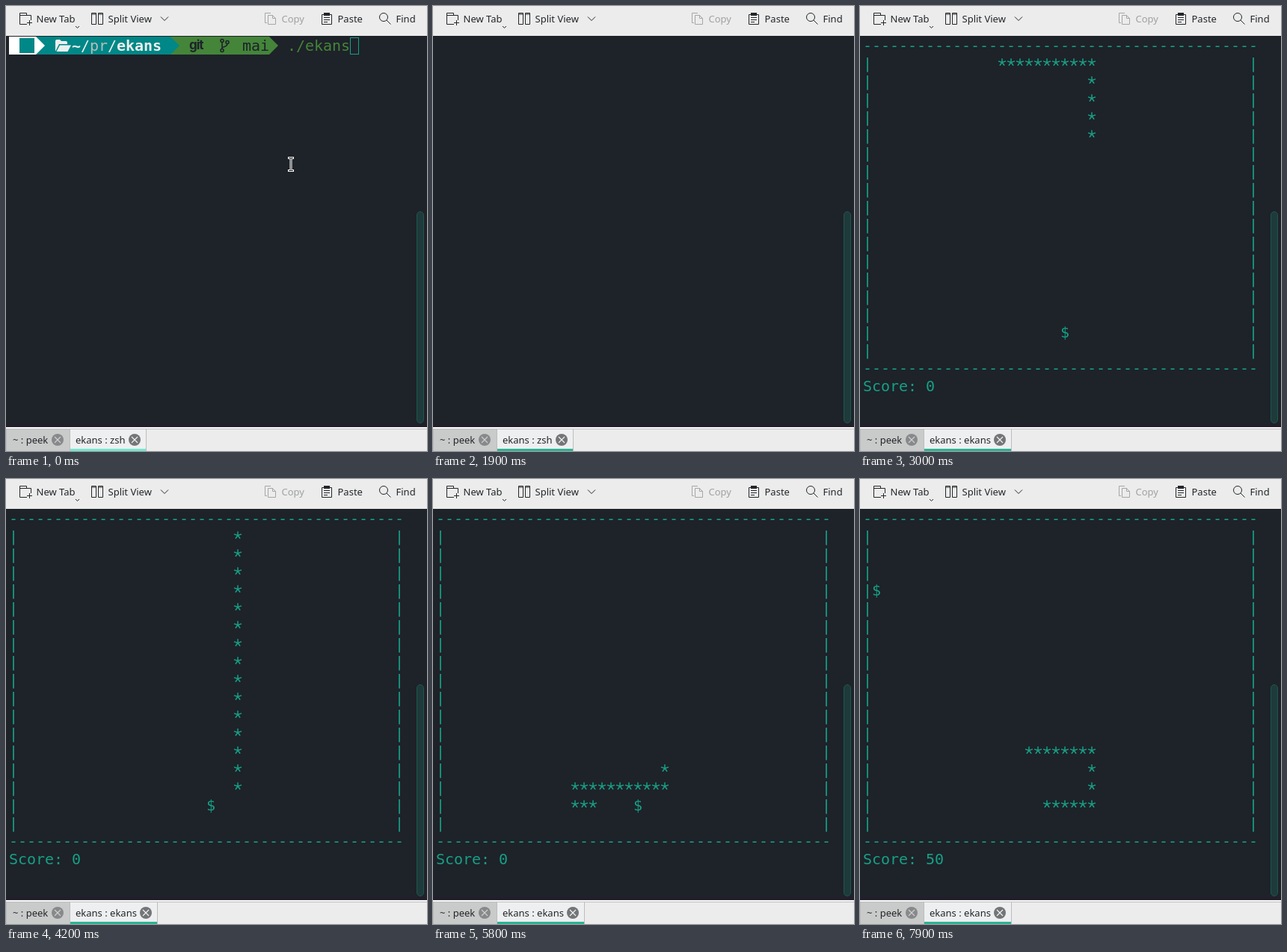
An HTML page for the animation above (8000 ms loop, 563 px wide and 596 px high).

```html
<!DOCTYPE html>
<html lang="en">
<head>
<meta charset="utf-8">
<title>Terminal snake</title>
<style>
  html, body { margin: 0; width: 100%; height: 100%; overflow: hidden; background: #1e2229; }
  svg { display: block; width: 563px; height: 596px; }
  text { white-space: pre; }
  .ui { font: 13px "Noto Sans", sans-serif; fill: #232629; }
  .mono { font: 20px "DejaVu Sans Mono", monospace; letter-spacing: -0.041px; fill: #16a085; }
  .bold { font-weight: bold; fill: #eee; }
  .icon { fill: none; stroke: #232629; }
</style>
</head>
<body>
<svg viewBox="0 0 563 596">
  <rect width="563" height="596" fill="#1e2229"/>

  <!-- toolbar -->
  <rect width="563" height="40" fill="#ececec"/>
  <g class="icon">
    <path d="M28 24.5H18.5V9.5H27.5V12.5H33.5V19M18 12.5H28M31.5 19V26M28 22.5H35"/>
    <path d="M93 27L95.5 29.5L98 27"/>
    <path d="M114.5 9.5h6v15h-6zM123.5 9.5h6v15h-6zM114 11h7M123 11h7"/>
    <path d="M207 14.5L212 19.5L217 14.5"/>
    <path d="M349 22.5H346.5V9.5H354M350.5 12.5H356.5L360.5 16.5V24.5H350.5zM356.5 12.5V16.5H360.5" stroke="#a5a6a7"/>
    <path d="M425 11.5H422.5V24.5H435.5V11.5H433M425 15.5H433M425 18.5H433M425 21.5H430"/>
    <path d="M425 9h8v4h-8z" fill="#232629" stroke="none"/>
    <circle cx="505" cy="15" r="5.5"/>
    <path d="M509 19L514.5 24.5"/>
  </g>
  <g class="ui">
    <text x="40.5" y="22">New Tab</text>
    <text x="136.5" y="22">Split View</text>
    <text x="368.5" y="22" fill="#a0a1a2" style="fill:#a0a1a2">Copy</text>
    <text x="443.5" y="22">Paste</text>
    <text x="521.5" y="22">Find</text>
  </g>

  <!-- shell prompt -->
  <g id="prompt" class="mono">
    <path d="M220 41H352L364 53L352 65H220z" fill="#44853a"/>
    <path d="M40 41H220L232 53L220 65H40z" fill="#008787"/>
    <path d="M4 41H40L52 53L40 65H4z" fill="#fff"/>
    <rect x="18" y="43" width="20" height="20" fill="#008787"/>
    <path d="M66 60V47Q66 45 68 45H72L74 47H80Q82 47 82 49V51H71L66.5 60zM67.5 61L72 52.5H87L82.5 61z" fill="#eee"/>
    <text x="88" y="60" class="bold">~</text>
    <text x="100" y="60" style="fill:#eee">/</text>
    <text x="112" y="60" style="fill:#bcbcbc">pr</text>
    <text x="136" y="60" style="fill:#eee">/</text>
    <text x="148" y="60" class="bold">ekans</text>
    <text x="245" y="58" style="font:bold 17px Inter,sans-serif;letter-spacing:-1px;fill:#1e2229">git</text>
    <g fill="none" stroke="#1e2229" stroke-width="1.6">
      <circle cx="289" cy="46.5" r="2"/>
      <circle cx="289" cy="59.5" r="2"/>
      <circle cx="296" cy="48.5" r="2"/>
      <path d="M289 48.5V57.5M296 50.5Q296 54 289 55.5"/>
    </g>
    <text x="316" y="60" style="fill:#1e2229">mai</text>
    <text x="376" y="60" style="fill:#44853a">./ekans</text>
  </g>
  <rect id="cursor" width="11" height="22" stroke="#16a085"/>

  <g id="game" class="mono">
    <g id="walls"></g>
    <path id="snake" fill="none" stroke="#16a085" stroke-width="1.5"/>
    <text id="food">$</text>
    <text id="score" x="4" y="516"></text>
  </g>

  <g id="pointer" fill="none">
    <path d="M377 203.5H385M377 220.5H385M381 203V221" stroke="#fff" stroke-width="3"/>
    <path d="M378 203.5H384M378 220.5H384M381 203V221" stroke="#1e2229"/>
  </g>

  <rect x="549.5" y="275.5" width="9" height="283" rx="4.5" fill="#1f3a3b" stroke="#1d564f"/>

  <!-- tab bar -->
  <rect y="560" width="563" height="4" fill="#221e2a"/>
  <rect y="564" width="563" height="32" fill="#ececec"/>
  <rect y="564" width="563" height="2" fill="#fafafa"/>
  <path d="M0 566.5H563" stroke="#bcbdbe"/>
  <rect x="1" y="567" width="84" height="29" fill="#c9caca"/>
  <path d="M.5 567V596" stroke="#bcbdbe"/>
  <rect id="tab" x="85.5" y="566.5" height="34" fill="#eeeff0" stroke="#bcbdbe"/>
  <rect id="line" x="86" y="593" height="3"/>
  <g class="ui">
    <text x="9" y="586">~ : peek</text>
    <text id="title" x="93" y="586"></text>
  </g>
  <g>
    <circle cx="69" cy="581" r="8" fill="#87898a"/>
    <path d="M65 577l8 8M73 577l-8 8" stroke="#d0d1d1" stroke-width="1.1"/>
  </g>
  <g id="close">
    <circle cy="581" r="8" fill="#737577"/>
    <path d="M-4 577l8 8M4 577l-8 8" stroke="#f4f5f5" stroke-width="1.1"/>
  </g>
</svg>
<script>
const LOOP = 8000, TICK = 100, START = 2100;
const PAUSES = [2700, 3200, 3800, 4400, 5000, 5600, 6200, 6900, 7500];
const CORNERS = [[7, 1], [25, 1], [25, 15], [15, 15], [15, 16], [25, 16], [25, 13], [18, 13]];
const FIRST_HEAD = 14, EAT = 50;

const $ = id => document.getElementById(id);
const set = (id, attrs) => {
  for (const k in attrs) $(id).setAttribute(k, attrs[k]);
};
const show = (id, on) => set(id, { visibility: on ? "visible" : "hidden" });
const colX = c => 4 + 12 * c;
const baseY = r => 60 + 24 * r;

// every cell the snake visits, in order
const trail = [CORNERS[0]];
for (const [cx, cy] of CORNERS.slice(1)) {
  let [x, y] = trail[trail.length - 1];
  while (x !== cx || y !== cy) {
    x += Math.sign(cx - x);
    y += Math.sign(cy - y);
    trail.push([x, y]);
  }
}

let arms = "";
for (let k = 0; k < 5; k++) {
  const a = k * Math.PI * 0.4;
  const dx = (5.3 * Math.sin(a)).toFixed(2), dy = (-5.3 * Math.cos(a)).toFixed(2);
  arms += `l${dx} ${dy}m${-dx} ${-dy}`;
}
const star = ([c, r]) => `M${colX(c) + 6} ${baseY(r) - 8.5}${arms}`;

const glyphs = (c, r, s) => `<text x="${colX(c)}" y="${baseY(r)}">${s}</text>`;
let walls = glyphs(0, 0, "-".repeat(44)) + glyphs(0, 18, "-".repeat(44));
for (let r = 1; r < 18; r++) walls += glyphs(0, r, "|") + glyphs(43, r, "|");
$("walls").innerHTML = walls;

function drawShell(t) {
  show("prompt", t < 1800);
  show("cursor", t < 1900);
  const [c, r] = t < 1700 ? [38, 0] : t < 1800 ? [0, 1] : [0, 0];
  set("cursor", { x: colX(c) + 0.5, y: baseY(r) - 17.5, fill: t < 700 ? "none" : "#16a085" });
  show("pointer", t < 1200);
  set("pointer", { transform: t < 1100 ? "" : "translate(4 10)" });
}

function drawGame(t) {
  const on = t >= START;
  show("game", on);
  if (!on) return;
  const steps = (t - START) / TICK - PAUSES.filter(p => p <= t).length;
  const head = FIRST_HEAD + steps;
  const fed = head >= EAT;
  const body = trail.slice(head - (fed ? 15 : 14), head + 1);
  set("snake", { d: body.map(star).join("") });
  const [c, r] = fed ? [1, 4] : [22, 16];
  set("food", { x: colX(c), y: baseY(r) });
  $("score").textContent = "Score: " + (fed ? 50 : 0);
}

function drawTab(t) {
  const playing = t >= START;
  const right = playing ? 202 : 187;
  $("title").textContent = playing ? "ekans : ekans" : "ekans : zsh";
  set("tab", { width: right - 85 });
  set("line", { width: right - 86, fill: t < 700 ? "#74e8d1" : "#2ab594" });
  set("close", { transform: `translate(${right - 15} 0)` });
}

function draw(ms) {
  const t = Math.floor((ms % LOOP) / TICK) * TICK;
  drawShell(t);
  drawGame(t);
  drawTab(t);
}

const t0 = performance.now();
function frame() {
  draw(performance.now() - t0);
  requestAnimationFrame(frame);
}
frame();
</script>
</body>
</html>
```
